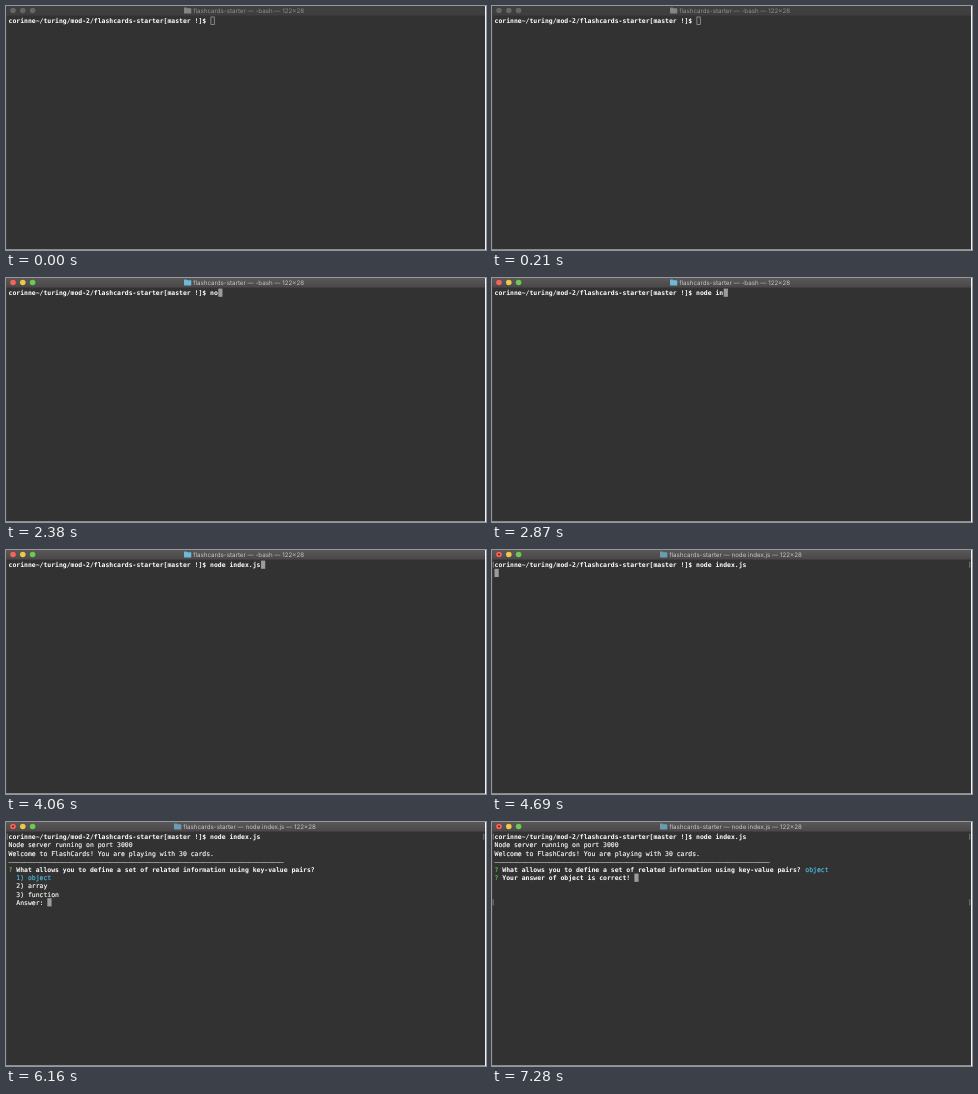
An HTML page for the animation above (8000 ms loop, 480 px wide and 244 px high).

```html
<!DOCTYPE html>
<html lang="en">
<head>
<meta charset="utf-8">
<title>Flashcards in the terminal</title>
<style>
  html, body { margin: 0; width: 100%; height: 100%; overflow: hidden; background: #323232; }
  svg { display: block; width: 480px; height: 244px; }
  text { white-space: pre; text-rendering: geometricPrecision; }
  .term { font: 6.453px "DejaVu Sans Mono", monospace; fill: #fff; stroke: #fff; stroke-width: .14; }
  .bold { font-weight: bold; stroke: none; }
  .cyan { fill: #4fc0e4; stroke: #4fc0e4; }
  .green { fill: #5cb848; }
  .title { font: 6.2px Inter, sans-serif; fill: #c8c6c7; }

  /* The window gains focus at 980 ms. */
  .blurred, .focused { animation: 8s step-end infinite; }
  .blurred { animation-name: blurred; }
  .focused { animation-name: focused; }
  @keyframes blurred { 0% { visibility: visible; } 12.25%, 100% { visibility: hidden; } }
  @keyframes focused { 0% { visibility: hidden; } 12.25%, 100% { visibility: visible; } }
</style>
</head>
<body>
<svg viewBox="0 0 480 244">
  <defs>
    <linearGradient id="bar" x2="0" y2="1">
      <stop stop-color="#5a5759"/><stop offset="1" stop-color="#4b484a"/>
    </linearGradient>
    <path id="folder" d="M0 .7Q0 0 .7 0H2.6L3.4.8H6.6Q7.3.8 7.3 1.5V5.3Q7.3 6 6.6 6H.7Q0 6 0 5.3Z"/>
  </defs>

  <rect width="480" height="244" fill="#323232"/>
  <path d="M0 243.5H480" stroke="#8c8c8c"/>
  <path d="M479.5 0V244" stroke="#f2f2f2"/>
  <path d="M.25 9V243" stroke="#555" stroke-width=".5"/>

  <g class="blurred">
    <rect width="479" height="9.5" fill="#3f3f3f"/>
    <g fill="#666">
      <circle cx="7" cy="4.5" r="2.8"/><circle cx="16.8" cy="4.5" r="2.8"/><circle cx="26.6" cy="4.5" r="2.8"/>
    </g>
    <use href="#folder" x="178" y="1.5" fill="#858585"/>
    <text class="title" x="187.3" y="6.9" style="fill:#919191">flashcards-starter — -bash — 122×28</text>
  </g>

  <g class="focused">
    <rect width="479" height="9.5" fill="url(#bar)"/>
    <circle cx="7" cy="4.5" r="2.8" fill="#fb6159"/>
    <circle cx="16.8" cy="4.5" r="2.8" fill="#efc746"/>
    <circle cx="26.6" cy="4.5" r="2.8" fill="#6cc94e"/>
    <g data-on="980" data-off="4690">
      <use href="#folder" x="178" y="1.5" fill="#6db9dc"/>
      <text class="title" x="187.3" y="6.9">flashcards-starter — -bash — 122×28</text>
    </g>
    <g data-on="4690">
      <circle cx="7" cy="4.5" r="1" fill="#7a1512"/>
      <use href="#folder" x="168" y="1.5" fill="#6b9cb2"/>
      <text class="title" x="177.3" y="6.9">flashcards-starter — node index.js — 122×28</text>
    </g>
  </g>

  <g stroke="#8a8a8a" stroke-width=".8" fill="none">
    <path data-on="4550" d="M2 12.2H1.2V17.2H2M477 12.2H477.8V17.2H477"/>
    <path data-on="7140" d="M2 77.8H1.2V82.8H2M477 77.8H477.8V82.8H477"/>
  </g>

  <rect id="cursor"/>

  <g class="term">
    <text class="bold" data-row="0">corinne~/turing/mod-2/flashcards-starter[master !]$ <tspan id="typed"></tspan></text>
    <g data-on="5880">
      <text data-row="1">Node server running on port 3000</text>
      <text data-row="2">Welcome to FlashCards! You are playing with 30 cards.</text>
      <text data-row="3" id="rule"></text>
      <text class="bold" data-row="4"><tspan class="green">?</tspan> What allows you to define a set of related information using key-value pairs?</text>
    </g>
    <g data-on="5880" data-off="7140">
      <text class="cyan" data-row="5">  1) object</text>
      <text data-row="6">  2) array</text>
      <text data-row="7">  3) function</text>
      <text data-row="8">  Answer:</text>
    </g>
    <text class="cyan" data-row="4" data-col="80" data-on="7140">object</text>
    <text class="bold" data-row="5" data-on="7210"><tspan class="green">?</tspan> Your answer of object is correct!</text>
  </g>
</svg>
<script>
  const LOOP = 8000, LEFT = 2.5, COL = 3.885, ROW = 8.2;
  const COMMAND = "node index.js", PROMPT = 52;
  // [time, characters typed]
  const keys = [[0, 0], [2380, 2], [2450, 3], [2590, 4], [2660, 5], [2800, 6], [2870, 7],
    [3010, 9], [3360, 10], [3640, 11], [3850, 12], [4060, 13]];
  // [time, row, column] once the command has been entered
  const stops = [[4550, 1, 0], [5880, 8, 10], [7140, 5, 0], [7210, 5, 36]];

  const $ = id => document.getElementById(id);
  const cursor = $("cursor"), typed = $("typed");
  const timed = [...document.querySelectorAll("[data-on]")];
  const latest = (list, t) => list.filter(step => step[0] <= t).pop();
  const set = (el, attrs) => Object.entries(attrs).forEach(([k, v]) => el.setAttribute(k, v));

  $("rule").textContent = "—".repeat(71);
  for (const line of document.querySelectorAll("[data-row]")) {
    const { row, col = 0 } = line.dataset;
    set(line, { x: LEFT + col * COL, y: 17.25 + row * ROW });
  }

  function draw(t) {
    for (const el of timed) {
      const { on, off = LOOP } = el.dataset;
      el.style.display = t >= on && t < off ? "" : "none";
    }
    const count = latest(keys, t)[1];
    typed.textContent = COMMAND.slice(0, count);

    const [, row, col] = latest(stops, t) || [0, 0, PROMPT + count];
    const filled = t >= 1050, inset = filled ? 0 : 0.4;
    set(cursor, {
      x: LEFT + col * COL + inset,
      y: 10.6 + row * ROW + inset,
      width: 4.2 - 2 * inset,
      height: ROW - 2 * inset,
      fill: filled ? "#9c9c9c" : "none",
      stroke: filled ? "none" : "#9c9c9c",
      "stroke-width": 0.8
    });
  }

  function tick() {
    draw(performance.now() % LOOP);
    requestAnimationFrame(tick);
  }
  tick();
</script>
</body>
</html>
```
